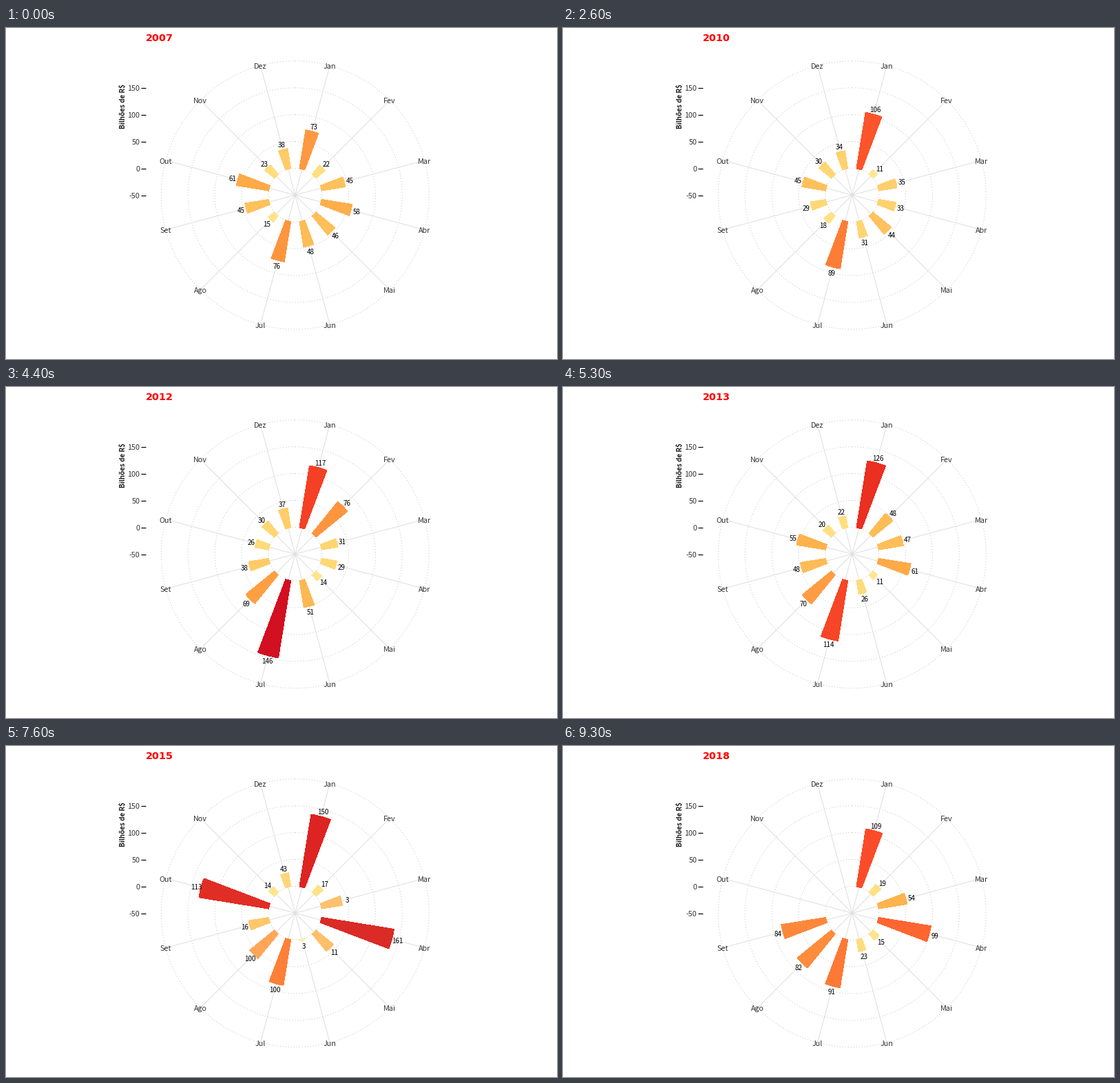
Animation of 800 by 480 pixels, one loop 10000 ms. Source, as a matplotlib script:

```python
from itertools import zip_longest

import numpy as np
import matplotlib.pyplot as plt
from matplotlib.animation import FuncAnimation
from matplotlib.colors import to_rgb

W, H, DPI = 800, 480, 100
PX = 72 / DPI                    # points per pixel
CX, CY, UNIT = 419.8, 242.3, 0.778
HALF_WIDTH = 5.8                 # degrees
FONT = "Noto Sans CJK JP"
CAP = 0.733                      # digit height in em

MONTHS = "Jan Fev Mar Abr Mai Jun Jul Ago Set Out Nov Dez".split()
YEARS = range(2007, 2019)
BILLIONS = {
    2007: (73, 22, 45, 58, 46, 48, 76, 15, 45, 61, 23, 38),
    2009: (94, 10, 28, 39, 39, 34, 50, 26, 47, 51, 27, 42),
    2011: (118, 12, 42, 27, 50, 28, 128, 11, 12, 39, 34, 26),
    2012: (117, 76, 31, 29, 14, 51, 146, 69, 38, 26, 30, 37),
    2014: (135, 21, 63, 93, 8, 2, 83, 71, 58, 84, 10, 7),
    2015: (123, 17, 76, 113, 73, 2, 73, 19, 60, 151, 13, 9),
    2016: (150, 17, 3, 161, 11, 3, 100, 100, 16, 113, 14, 43),
    2018: (109, 19, 54, 99, 15, 23, 91, 82, 84),
}


def amounts(year):
    """Monthly values; a year without data is the mean of its neighbours."""
    if year in BILLIONS:
        return BILLIONS[year]
    pairs = zip_longest(BILLIONS[year - 1], BILLIONS[year + 1])
    return [a if b is None else (a + b) // 2 for a, b in pairs]


# Frames halfway between two years; later years pass one frame faster
SWITCHES = [7 + 9 * k - max(0, k - 5) for k in range(len(YEARS) - 1)]

RGB_TO_XYZ = np.array([[0.4124, 0.3576, 0.1805],
                       [0.2126, 0.7152, 0.0722],
                       [0.0193, 0.1192, 0.9505]])


def to_lab(color):
    """Cube roots of XYZ: mixing here equals mixing in CIELAB."""
    rgb = np.array(to_rgb(color))
    linear = np.where(rgb > 0.04045, ((rgb + 0.055) / 1.055) ** 2.4, rgb / 12.92)
    return np.cbrt(RGB_TO_XYZ @ linear)


def from_lab(lab):
    linear = np.clip(np.linalg.solve(RGB_TO_XYZ, lab ** 3), 0, 1)
    rgb = np.where(linear > 0.0031308,
                   1.055 * linear ** (1 / 2.4) - 0.055, 12.92 * linear)
    return np.clip(rgb, 0, 1)


PALETTE = np.array([to_lab(c) for c in (
    "#FFEDA0", "#FED976", "#FEB24C", "#FD8D3C", "#FC4E2A", "#E31A1C", "#BD0026")])


def heat(value):
    pos = np.clip((value - 2) / 159, 0, 1) * (len(PALETTE) - 1)
    return np.array([np.interp(pos, range(len(PALETTE)), ch) for ch in PALETTE.T])


def radius(value):
    return (value + 50) * UNIT


def polar(r, degrees, cx=CX, cy=CY):
    a = np.radians(degrees)
    return cx + r * np.sin(a), cy - r * np.cos(a)


def write(x, y, text, size, ha="center", family=FONT, **style):
    """Place text with its digit height centred on y."""
    return ax.text(x, y + size * CAP / 2, text, fontsize=size * PX,
                   family=family, ha=ha, va="baseline", **style)


fig = plt.figure(figsize=(W / DPI, H / DPI), dpi=DPI, facecolor="white")
ax = fig.add_axes([0, 0, 1, 1])
ax.set(xlim=(0, W), ylim=(H, 0))
ax.axis("off")

# Grid
turn = np.linspace(0, 360, 361)
for level in range(0, 201, 50):
    ax.plot(*polar(radius(level), turn), color="#c4c4c4", lw=PX,
            ls=(0, (1, 3)), zorder=1)
for i, month in enumerate(MONTHS):
    x, y = polar(radius(200), 15 + 30 * i)
    ax.plot([CX, x], [CY, y], color="#dedede", lw=PX, zorder=1)
    write(x - 0.3, y + 0.6, month, 10.8, color="#333333", zorder=4)

# Radial scale
for level in range(-50, 151, 50):
    y = 242.5 - radius(level)
    ax.plot([196, 203], [y, y], color="black", lw=1.2 * PX,
            solid_capstyle="butt", zorder=2)
    write(194.5, y + 0.5, str(level), 10.8, ha="right", color="#333333")
ax.text(172.5, 114, "Bilhões de R$", fontsize=9.9 * PX, family=FONT,
        weight="bold", color="#222222", rotation=90, rotation_mode="anchor",
        ha="center", va="baseline", parse_math=False)

title = write(202.5, 13.5, "", 14.4, ha="left", family="DejaVu Sans",
              weight="bold", color="red")
bars = [ax.fill([0], [0], lw=0, antialiased=False, zorder=3)[0] for _ in MONTHS]
labels = [write(0, 0, "", 9.85, color="black", zorder=5) for _ in MONTHS]


def draw(frame):
    halfway = frame in SWITCHES
    index = sum(s <= frame for s in SWITCHES)
    new = amounts(YEARS[index])
    old = amounts(YEARS[index - 1]) if halfway else new
    title.set_text(str(YEARS[index - halfway]))

    for i, (bar, label) in enumerate(zip(bars, labels)):
        shown = i < len(new)
        bar.set_visible(shown)
        label.set_visible(shown)
        if not shown:
            continue
        value = (old[i] + new[i]) / 2
        angle = 15 + 30 * i
        arc = np.linspace(angle - HALF_WIDTH, angle + HALF_WIDTH, 13)
        outer = np.column_stack(polar(radius(value), arc))
        inner = np.column_stack(polar(radius(0), arc[::-1]))
        bar.set_xy(np.vstack([outer, inner]))
        bar.set_facecolor(from_lab((heat(old[i]) + heat(new[i])) / 2))
        x, y = polar(radius(value + 10), angle)
        label.set_position((x + 0.5, y + 0.7 + 9.85 * CAP / 2))
        label.set_text(str(new[i]))
    return [title, *bars, *labels]


animation = FuncAnimation(fig, draw, frames=100, interval=100,
                          repeat=True, repeat_delay=0)
plt.show()
```
